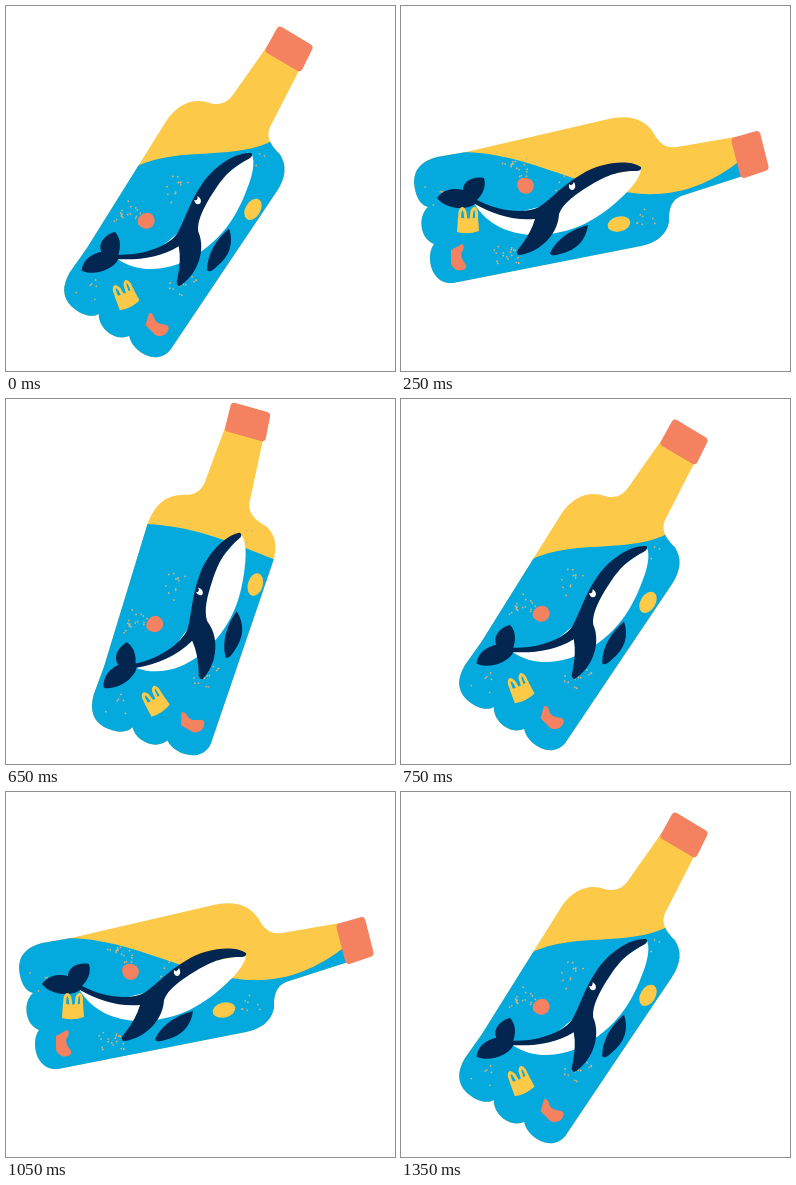
Write an HTML page that moves like this. It is 389 px wide and 365 px high and loops after 1450 ms.

```html
<!DOCTYPE html>
<html lang="en">
<head>
<meta charset="utf-8">
<title>Whale in a bottle</title>
<style>
  html, body { margin: 0; width: 100%; height: 100%; overflow: hidden; background: #fff; }
  svg { display: block; width: 389px; height: 365px; }
  .yellow { fill: #fcc948; }
  .blue { fill: #04a9dd; }
  .coral { fill: #f4815f; }
  .navy { fill: #02264f; }
  .white { fill: #fff; }
</style>
</head>
<body>
<svg viewBox="0 0 389 365">
  <clipPath id="bottle">
    <path id="outline" d="M334 131L276 141Q262 143 255 131Q243 107 212 112L65 146L36 151Q13 157 13 176
      C14 190 19 199 27 201C17 210 18 232 33 238C24 250 30 279 52 277L240 240Q264 235 268 216Q267 195 280 190L342 170Z"/>
  </clipPath>
  <g clip-path="url(#bottle)">
    <rect class="yellow" width="389" height="365"/>
    <path id="water" class="blue"/>
  </g>
  <g id="contents">
    <path class="coral" stroke="#f4815f" stroke-width="8" stroke-linejoin="round" d="M334.5 135L355.5 129L363.5 161L343 168Z"/>
    <g id="specks"></g>
    <path id="pebble" class="coral" d="M-8-3Q-6-9 2-8Q9-6 9 0Q8 7 1 8Q-8 7-8-3Z"/>
    <ellipse id="lemon" class="yellow" rx="11.5" ry="7.5"/>
    <path id="shard" class="coral" d="M-8-7L3-13Q6-12 4-7Q0-2 5 5Q9 9 6 12Q0 15-4 12Q-9 9-8 3Z"/>
    <g id="whale">
      <path class="white" d="M73 197C86 219 108 228 132 229C174 229 200 211 222 190Q239 174 240 163L190 172L150 198L110 208Z"/>
      <path class="navy" d="M36 192C43 182 54 182 62 184C62 176 71 170 83 172C86 182 80 190 76 194C98 206 125 208 138 201
        C150 193 163 178 181 168C200 156 228 153 240 161Q241 165 235 165C212 165 200 173 188 180C175 188 162 197 158 208
        C157 231 135 248 117 249Q114 246 119 241Q130 227 134 213C112 215 92 208 74 198C66 205 44 203 36 192Z"/>
      <path class="navy" d="M187 219C172 223 157 231 149 247Q150 251 159 248C176 244 185 234 187 219Z"/>
      <path class="white" d="M168 178Q171 181 173 176Q176 181 172 184Q167 184 168 178Z"/>
    </g>
    <g id="bag">
      <path class="yellow" d="M-10-3Q0 0 10-3L11 11Q0 15-11 12Z"/>
      <path fill="none" stroke="#fcc948" stroke-width="3" d="M-8.5 0L-8-8Q-6-15-3-8L-2 0M3 0L4-9Q7-15 8.5-8V0"/>
    </g>
  </g>
</svg>
<script>
const el = id => document.getElementById(id);
const PIVOT = '189 175', LOOP = 1450, STEP = 100;

// From lying to upright: the bottle turns 15 degrees per pose, its contents slide inside it.
const poses = [
  { bottle: [0, 0, 0],    whale: [0, 0, 0],    pebble: [124, 180], lemon: [218, 218], shard: [58, 251],
    bag: [67, 214, 0],    wave: 'M60 146C160 146 235 233 336 157' },
  { bottle: [0, 0, -15],  whale: [3, 0, 5],    pebble: [125, 175], lemon: [214, 228], shard: [60, 252],
    bag: [63, 215, 5],    wave: 'M87 157C175 158 230 180 311 145' },
  { bottle: [0, 0, -30],  whale: [6, -1, 10],  pebble: [126, 171], lemon: [211, 237], shard: [61, 254],
    bag: [59, 216, 10],   wave: 'M113 167C190 169 225 126 286 132' },
  { bottle: [0, 0, -45],  whale: [9, 0, 19],   pebble: [126, 169], lemon: [210, 236], shard: [60, 249],
    bag: [59, 206, 21],   wave: 'M131 160C175 140 230 155 268 134' },
  { bottle: [-4, 0, -60], whale: [10, 0, 20],  pebble: [127, 169], lemon: [212, 236], shard: [61, 249],
    bag: [61, 207, 29],   wave: 'M142 125C195 128 235 148 270 161' },
];

let seed = 7;
const random = () => (seed = seed * 16807 % 2147483647) / 2147483647;
// Clusters of specks around the pebble: x, y, count
const clusters = [[45, -4, 12], [-10, -18, 18], [-17, 69, 22], [-88, 11, 6], [126, 29, 8]];
el('specks').innerHTML = clusters.map(([x, y, count]) =>
  Array.from({ length: count }, () =>
    `<circle cx="${x + (random() - .5) * 28}" cy="${y + (random() - .5) * 20}" r=".9" fill="#d9b27c"/>`
  ).join('')).join('');

function place(id, [x, y, angle = 0], center = '0 0') {
  el(id).setAttribute('transform', `translate(${x} ${y}) rotate(${angle} ${center})`);
}

function draw(pose) {
  place('outline', pose.bottle, PIVOT);
  place('contents', pose.bottle, PIVOT);
  const endY = pose.wave.split(' ').pop(), startY = pose.wave.match(/ (\d+)C/)[1];
  el('water').setAttribute('d', `${pose.wave}L389 ${endY}V365H0V${startY}Z`);
  place('whale', pose.whale, '138 176.5');
  for (const id of ['pebble', 'shard', 'bag']) place(id, pose[id]);
  place('specks', pose.pebble);
  place('lemon', [...pose.lemon, -14]);
}

function tick() {
  const step = Math.floor((performance.now() % LOOP + STEP / 2) / STEP);
  draw(poses[4 - Math.abs(4 - (step + 5) % 8)]);
  requestAnimationFrame(tick);
}
tick();
</script>
</body>
</html>
```
